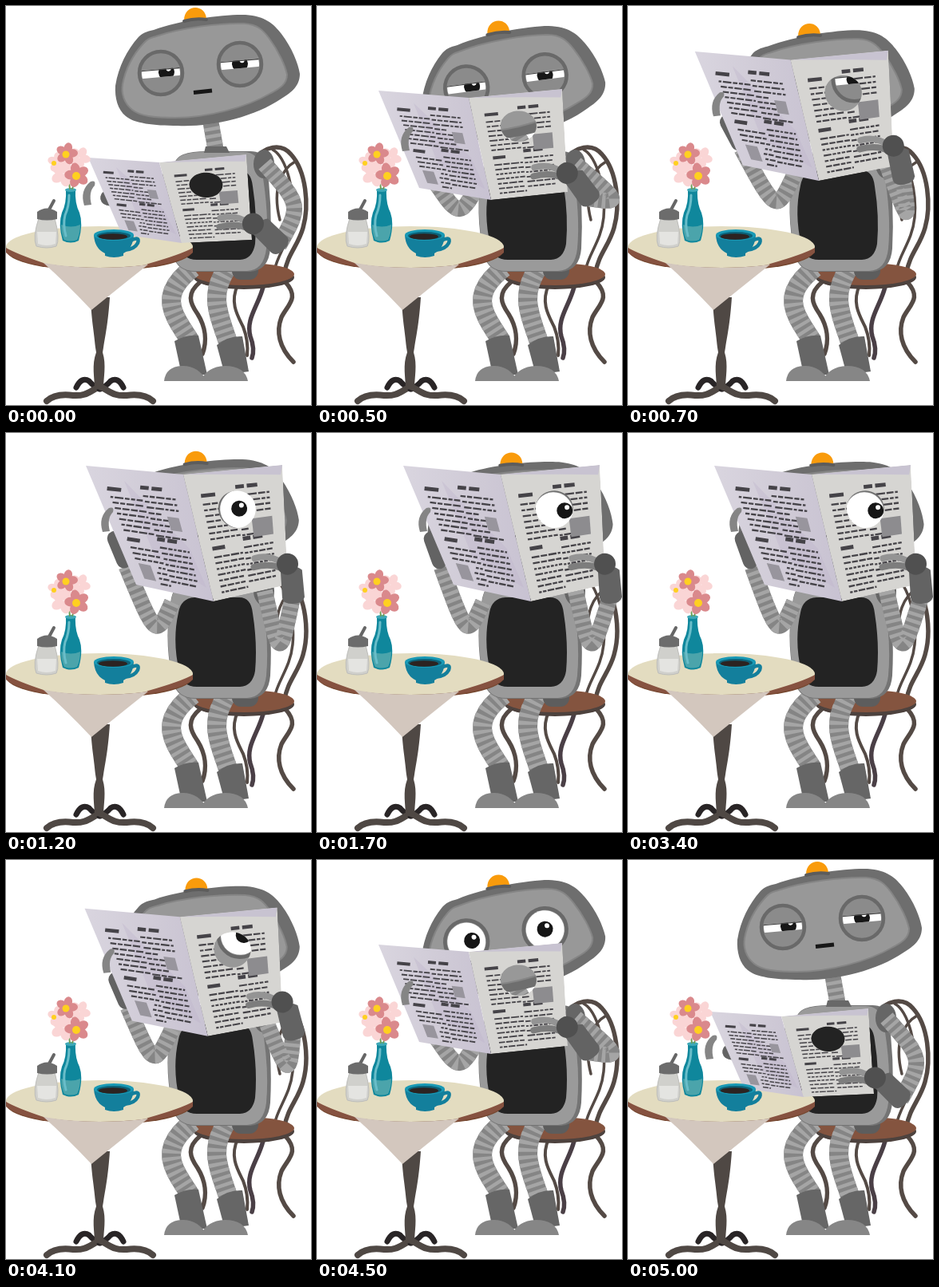
Recreate the animation shown at these times as an HTML page. Size 382 by 500 pixels, loop 5.5 s.

```html
<!DOCTYPE html>
<html lang="en">
<head>
<meta charset="utf-8">
<title>Robot reading the paper</title>
<style>
  html, body { margin: 0; width: 100%; height: 100%; overflow: hidden; background: #fff; }
  svg { display: block; width: 100vw; height: 100vh; }
  .line { fill: none; stroke-linecap: round; }
  .tube path { fill: none; stroke: #858585; stroke-width: 20; }
  .tube path + path { stroke: #a5a5a5; stroke-dasharray: 4.5 4.5; }
  .leg path { stroke-width: 24; }
  .iron { fill: none; stroke: #544a45; stroke-width: 5.5; stroke-linecap: round; }
  .ink { fill: none; stroke: #454348; }
</style>
</head>
<body>
<svg viewBox="0 0 382 500">
  <defs>
    <linearGradient id="lav"><stop offset="0" stop-color="#d9d5df"/><stop offset=".6" stop-color="#cfcad6"/><stop offset="1" stop-color="#c8c2d2"/></linearGradient>
    <clipPath id="lid"><rect id="slit" x="-25" width="50"/></clipPath>
    <clipPath id="sheet"><path id="cut" clip-rule="evenodd"/></clipPath>
    <g id="flower">
      <g id="petals"><ellipse cy="-9" rx="6.5" ry="8.5"/><ellipse cy="-9" rx="6.5" ry="8.5" transform="rotate(72)"/></g>
      <use href="#petals" transform="rotate(144)"/>
      <ellipse cy="-9" rx="6.5" ry="8.5" transform="rotate(288)"/>
    </g>
    <g id="feet">
      <path d="M88 478Q95 464 104 470Q111 478 118 480" stroke="#292526" stroke-width="7"/>
      <path d="M117 477C103 484 100 489 84 488Q62 485 51 495" stroke="#4f4844" stroke-width="8"/>
    </g>
  </defs>

  <!-- chair -->
  <g class="iron">
    <path d="M314 192C322 176 345 171 357 186C376 207 380 250 372 278C366 300 352 312 349 334"/>
    <path d="M334 180C352 190 362 235 359 265C356 295 340 310 336 332M362 195C348 203 332 225 343 268" stroke-width="3.5"/>
    <path d="M322 352C316 376 300 392 306 414Q312 430 308 441" stroke="#4a3f46"/>
    <path d="M243 346C226 360 230 372 240 386C250 402 252 420 246 436"/>
    <path d="M290 350C280 372 290 388 297 402Q304 420 302 438" stroke-width="4"/>
    <path d="M350 346C368 366 353 374 345 390C338 408 342 428 360 446"/>
  </g>
  <ellipse cx="298" cy="340" rx="63" ry="15" fill="#4d423e"/>
  <ellipse cx="298" cy="336" rx="63" ry="14" fill="#84543f"/>

  <!-- legs and body -->
  <g class="tube leg" id="legL"></g>
  <g class="tube leg" id="legR"></g>
  <path d="M211 420Q226 411 241 413L252 462H220Z" fill="#666"/>
  <path d="M198 470Q200 452 220 451Q240 450 252 470Z" fill="#868686"/>
  <path d="M264 425Q278 413 296 414L304 458L274 462Z" fill="#666"/>
  <path d="M244 470Q251 452 274 451Q299 451 303 470Z" fill="#868686"/>
  <rect x="283" y="318" width="33" height="25" rx="11" fill="#5d5d5d"/>
  <path d="M222 186Q232 182 252 182H306Q321 182 326 195Q334 250 331 304Q329 331 306 333H238Q214 333 209 312Q197 258 207 207Q211 190 222 186Z" fill="#747474"/>
  <path d="M219 188Q229 183 247 183H297Q316 183 320 204Q330 260 326 304Q323 331 302 332H237Q214 332 209 310Q198 258 207 209Q210 193 219 188Z" fill="#9a9a9a"/>
  <path d="M236 206H292Q307 206 309 226Q315 264 312 298Q309 317 293 318H239Q220 318 217 299Q208 260 216 225Q219 207 236 206Z" fill="#232323"/>
  <ellipse cx="323" cy="198" rx="13" ry="18" fill="#666"/>

  <!-- head -->
  <g class="tube" id="neck"></g>
  <path d="M248 184L250 176H276L280 184Z" fill="#686868"/>
  <g id="head">
    <path d="M185 30C220 17 275 10 300 11C325 13 335 22 345 35C358 52 366 72 368 85C368 100 358 108 345 116C310 140 255 152 215 150C185 150 160 147 150 138C140 130 136 115 137 100C141 75 152 55 165 40C170 34 176 32 185 30Z" fill="#6e6e6e"/>
    <path d="M188 38C220 27 270 21 298 22C315 23 322 30 330 41C341 56 350 75 352 86C352 97 344 103 332 109C300 128 250 140 212 140C185 140 168 138 158 130C148 122 144 110 146 98C150 77 160 60 172 47C177 41 181 40 188 38Z" fill="#989898" stroke="#858585" stroke-width="2"/>
    <path d="M223 18C223 -3 250 -3 251 16Q237 14 223 18Z" fill="#f99b0c"/>
    <path d="M223 19Q237 15 251 17" class="line" stroke="#5c5c5c" stroke-width="4"/>
    <path d="M235 108.500L258 106" stroke="#171717" stroke-width="5"/>
    <g class="eye" transform="translate(194 84)"></g>
    <g class="eye" transform="translate(293 73)"></g>
  </g>

  <!-- table -->
  <g class="iron">
    <use href="#feet"/>
    <use href="#feet" transform="matrix(-1 0 0 1 235 0)"/>
  </g>
  <path d="M106 365H130C128 395 125 410 122 428L121 434C126 450 122 465 122 480H111C111 465 107 450 113 434L112 428C110 405 107 395 106 365Z" fill="#4f4844"/>
  <path d="M0 301V306A117 26 0 0 0 234 306V301Z" fill="#75472f"/>
  <ellipse cx="117" cy="302" rx="117" ry="26" fill="#e3dcc0"/>
  <path d="M0 303Q14 311 47 322L60 328Q15 322 0 309ZM234 303Q220 311 178 323L168 328Q220 322 234 309Z" fill="#865240"/>
  <path d="M47 322Q112 333 178 324Q150 346 107 381Q75 347 47 322Z" fill="#d3c7be"/>

  <!-- arms and newspaper -->
  <g class="tube" id="armL"></g>
  <path class="line" id="cuffL" stroke="#636363" stroke-width="19"/>
  <g class="tube" id="armR"></g>
  <path id="left" fill="url(#lav)"/>
  <path id="shade" fill="#bdb5cb" opacity=".4"/>
  <path class="ink" id="textL"/><path class="ink" id="titleL"/><path id="photoL" fill="#98959d"/>
  <g clip-path="url(#sheet)">
    <path id="right" fill="#d6d5d2"/>
    <path id="fold" fill="#c8c3d1"/>
    <path class="ink" id="textR"/><path class="ink" id="titleR"/><path id="photoR" fill="#8d8c8f"/>
  </g>
  <path id="handL" d="M-6 14Q-12 -5 2 -16Q9 -18 7 -11Q-1 -3 3 13Z" fill="#858585"/>
  <g id="handR" class="line" stroke-width="8">
    <path d="M24 9Q8 0 -14 6" stroke="#7d7d7d"/>
    <path d="M24 2Q5 -11 -13 -5" stroke="#949494"/>
  </g>
  <g id="wrist">
    <path d="M-9 5Q8 0 18 8L20 42Q18 50 5 50Q-7 50 -8 42Z" fill="#636363"/>
    <circle r="13.500" fill="#505050"/>
  </g>

  <!-- things on the table -->
  <path d="M53 257L60 244" class="line" stroke="#666" stroke-width="4"/>
  <path d="M41 266H61Q68 292 63 301Q51 305 38 301Q33 290 41 266Z" fill="#d0d0cc" stroke="#bdbdba"/>
  <path d="M39 283H63L62 298Q51 302 40 298Z" fill="#e4e4e1"/>
  <path d="M39 267V258Q51 249 64 258V267Q51 270 39 267Z" fill="#6c6c6c"/>
  <path d="M75 230H87Q86 247 92 259Q97 273 91 294Q81 299 71 294Q65 273 70 259Q76 247 75 230Z" fill="#0f879c"/>
  <path d="M69 274Q81 279 93 274Q93 285 89 293Q81 296 73 293Q69 285 69 274Z" fill="#4ba4ab"/>
  <path d="M79 237Q79 251 74 262Q71 274 75 288" class="line" stroke="#69bdc9" stroke-width="3"/>
  <ellipse cx="81" cy="230.500" rx="7" ry="2.500" fill="#3ea8b7"/>
  <path d="M76 200L80 229M89 212L83 229" class="line" stroke="#6f9d57" stroke-width="2"/>
  <g fill="#fad5d5">
    <use href="#flower" transform="translate(92 190) rotate(30) scale(.8)"/>
    <use href="#flower" transform="translate(72 210) rotate(20) scale(.95)"/>
    <use href="#flower" transform="translate(65 196) scale(.75)"/>
  </g>
  <g fill="#da898c">
    <use href="#flower" transform="translate(76 185) rotate(14) scale(.8)"/>
    <use href="#flower" transform="translate(89 212) rotate(-15) scale(.9)"/>
  </g>
  <g fill="#ffd020"><circle cx="60" cy="197" r="3"/><circle cx="75" cy="186" r="4.500"/><circle cx="88" cy="213" r="5"/></g>
  <path d="M156 294Q168 288 165 297Q161 305 148 306" class="line" stroke="#137f9c" stroke-width="4.500"/>
  <path d="M110 287Q111 304 124 310V313Q135 317 147 313V310Q159 304 160 287Z" fill="#137f9c"/>
  <ellipse cx="135" cy="287" rx="25" ry="7" fill="#1999b5"/>
  <ellipse cx="135" cy="288" rx="21" ry="5" fill="#0c6177"/>
  <ellipse cx="134" cy="289" rx="18" ry="3.800" fill="#2c2321"/>
</svg>

<script>
const $ = id => document.getElementById(id);
const put = (id, name, value) => $(id).setAttribute(name, value);
const mix = (a, b, k) => a.map((v, i) => v + (b[i] - v) * k);
const add = ([x, y], [dx, dy]) => [x + dx, y + dy];
const blend = (a, b, k) => Object.fromEntries(Object.keys(a).map(key => [key, mix(a[key], b[key], k)]));
const LOOP = 5500, STEP = 100;

// head: dx, dy, angle; paper: corners of top row, then bottom row; arm: right elbow, wrist angle; grip: left hand, left elbow
const reading = {
  head: [0, 0, 0], paper: [103, 190, 192, 196, 301, 186, 145, 286, 220, 297, 308, 293],
  arm: [370, 250, -43], grip: [104, 236, 180, 250]
};
const lifted = {
  head: [-7, 16, -2.5], paper: [77, 106, 190, 115, 307, 104, 128, 228, 218, 243, 314, 233],
  arm: [381, 247, -34], grip: [113, 168, 179, 267]
};
const hiding = {
  head: [3, 23, 3], paper: [108, 41, 230, 52, 354, 40, 171, 190, 268, 211, 361, 190],
  arm: [343, 284, -2], grip: [135, 110, 188, 257]
};
const slide = (dx, head) => ({
  ...hiding, head,
  paper: hiding.paper.map((v, i) => i % 2 ? v : v + dx),
  grip: mix(hiding.grip, [hiding.grip[0] + dx, 110, 188, 257], 1)
});
const up = slide(-22, [-10, 21, 0]);
const drift = slide(-15, [-5, 21, 1]);
const peek = slide(-8, [-1, 21, 1.5]);

// Keys: time, value, easing exponent of the way there
const poses = [
  [0, reading], [100, reading], [500, lifted, 1.3], [800, up, .7], [900, up], [1000, drift], [1100, drift],
  [1200, peek], [1400, hiding], [3800, hiding], [4500, lifted, 1.4], [5000, reading, .8], [LOOP, reading]];
const lids = [[0, .2], [900, .2], [1000, 1], [2800, 1], [3000, 0], [3100, 1], [4500, 1], [4900, .2], [LOOP, .2]];
const looks = [[0, 0], [1500, 0], [1700, 14], [2100, 14], [2400, -14], [3200, -14], [3400, 14], [3900, 14], [4200, 0], [LOOP, 0]];

function at(keys, t) {
  const i = keys.findIndex(k => k[0] > t);
  const [t0, a] = keys[i - 1], [t1, b, pow = 1] = keys[i];
  const k = ((t - t0) / (t1 - t0)) ** pow;
  return typeof a === 'number' ? a + (b - a) * k : blend(a, b, k);
}

let seed = 7;
const rand = () => (seed = seed * 16807 % 2147483647) / 2147483647;

// Two stories in two columns; photos are u0, v0, u1, v1 and push the text aside
function layout(photos) {
  const text = [], title = [];
  const free = (u, v) => !photos.some(p => u > p[0] - .05 && u < p[2] + .01 && v > p[1] - .02 && v < p[3] + .02);
  for (const [top, end] of [[.25, .56], [.67, .95]])
    for (const col of [0, 1]) {
      const u0 = .13 + col * .37, u1 = u0 + .35, v0 = top - col * .04;
      title.push([u0, v0 - .07, u0 + (col ? .09 : .15), v0 - .07]);
      if (col) title.push([u0 + .12, v0 - .07, u0 + .23, v0 - .07]);
      for (let v = v0; v < end; v += .046)
        for (let u = u0; u < u1 - .02;) {
          const stop = Math.min(u1, u + .03 + rand() * .07);
          if (free(u, v)) text.push([u, v, stop, v]);
          u = stop + .016;
        }
    }
  return { text, title, photos: photos.map(([a, b, c, d]) => [a, b, c, b, c, d, a, d]) };
}
const pages = {
  L: layout([[.15, .8, .3, .93], [.7, .36, .83, .47]]),
  R: layout([[.63, .41, .86, .56]])
};

const pageMap = (a, b, c, d) => (u, v) => mix(mix(a, b, u), mix(c, d, u), v);
const shape = (map, pts) => {
  let d = '';
  for (let i = 0; i < pts.length; i += 2) d += (i ? 'L' : 'M') + map(pts[i], pts[i + 1]).map(n => n.toFixed(2));
  return d;
};
const SHEET = [0, 0, 1, 0, 1, 1, 0, 1];
const HOLE = Array.from({ length: 80 }, (_, i) => {
  const a = (i >> 1) * Math.PI / 20;
  return i % 2 ? .32 + .15 * Math.sin(a) : .485 + .203 * Math.cos(a);
});

function print(side, map, scale) {
  const { text, title, photos } = pages[side];
  const path = list => list.map(pts => shape(map, pts)).join('');
  put('text' + side, 'd', path(text));
  put('text' + side, 'stroke-width', 2.2 * scale);
  put('title' + side, 'd', path(title));
  put('title' + side, 'stroke-width', 4.6 * scale);
  put('photo' + side, 'd', path(photos));
}

const tube = (id, d) => { $(id).innerHTML = `<path d="${d}"/><path d="${d}"/>`; };
const limb = (id, from, elbow, to) => tube(id, `M${from}C${elbow} ${elbow} ${to}`);
tube('legL', 'M234 328C190 362 208 385 231 420');
tube('legR', 'M277 328C254 362 266 385 278 421');

const eyes = [...document.querySelectorAll('.eye')];
for (const eye of eyes) eye.innerHTML = `
  <circle r="27" fill="#8b8b8b" stroke="#696969" stroke-width="4.5"/>
  <g transform="rotate(-5)" clip-path="url(#lid)">
    <circle r="24" fill="#fff"/>
    <g class="pupil"><circle r="10" fill="#161616"/><circle cx="3" cy="-4" r="3" fill="#fff"/></g>
    <path class="lash" stroke="#444" stroke-width="2.5"/>
  </g>`;
const pupils = eyes.map(e => e.querySelector('.pupil'));
const lashes = eyes.map(e => e.querySelector('.lash'));

function drawHead([dx, dy, angle], lid, look) {
  put('head', 'transform', `translate(${dx} ${dy}) rotate(${angle} 250 80)`);
  tube('neck', `M${256 + dx} ${143 + dy}L263 182`);
  put('slit', 'y', -25 * lid);
  put('slit', 'height', 50 * lid);
  pupils.forEach((e, i) => e.setAttribute('transform', `translate(${look + (i ? 0 : 7)} -.5)`));
  lashes.forEach(e => e.setAttribute('d', lid < .8 ? `M-24 ${-25 * lid}H24` : ''));
}

function drawPaper(paper) {
  const [tl, tm, tr, bl, bm, br] = [0, 2, 4, 6, 8, 10].map(i => paper.slice(i, i + 2));
  const left = pageMap(tl, tm, bl, bm), right = pageMap(tm, tr, bm, br);
  const scale = (bm[1] - tm[1]) / 150;
  put('left', 'd', shape(left, SHEET));
  put('shade', 'd', shape(left, [.35, .1, .86, .6, .95, .9, .4, .72]));
  put('right', 'd', shape(right, SHEET));
  put('cut', 'd', shape(right, SHEET) + 'Z' + shape(right, HOLE) + 'Z');
  put('fold', 'd', shape(right, [0, 0, 1, 0, .98, .08, .6, .045]));
  print('L', left, scale);
  print('R', right, scale);
  return right;
}

function drawArms(page, [ex, ey, turn], grip) {
  const hand = page(.73, .78), ball = add(hand, [28, 2]);
  const a = turn * Math.PI / 180, cos = Math.cos(a), sin = Math.sin(a);
  put('handR', 'transform', `translate(${hand})`);
  put('wrist', 'transform', `translate(${ball}) rotate(${turn})`);
  limb('armR', [324, 198], [ex, ey], add(ball, [5 * cos - 42 * sin, 5 * sin + 42 * cos]));

  const palm = grip.slice(0, 2), elbow = grip.slice(2);
  const reach = Math.hypot(elbow[0] - palm[0], elbow[1] - palm[1]);
  const along = px => mix(palm, elbow, px / reach);
  put('handL', 'transform', `translate(${palm})`);
  put('cuffL', 'd', `M${along(24)}L${along(54)}`);
  limb('armL', [208, 212], elbow, along(62));
}

function draw(t) {
  const { head, paper, arm, grip } = at(poses, t);
  drawHead(head, at(lids, t), at(looks, t));
  drawArms(drawPaper(paper), arm, grip);
}

function tick() {
  draw(Math.floor(performance.now() % LOOP / STEP) * STEP);
  requestAnimationFrame(tick);
}
tick();
</script>
</body>
</html>
```
